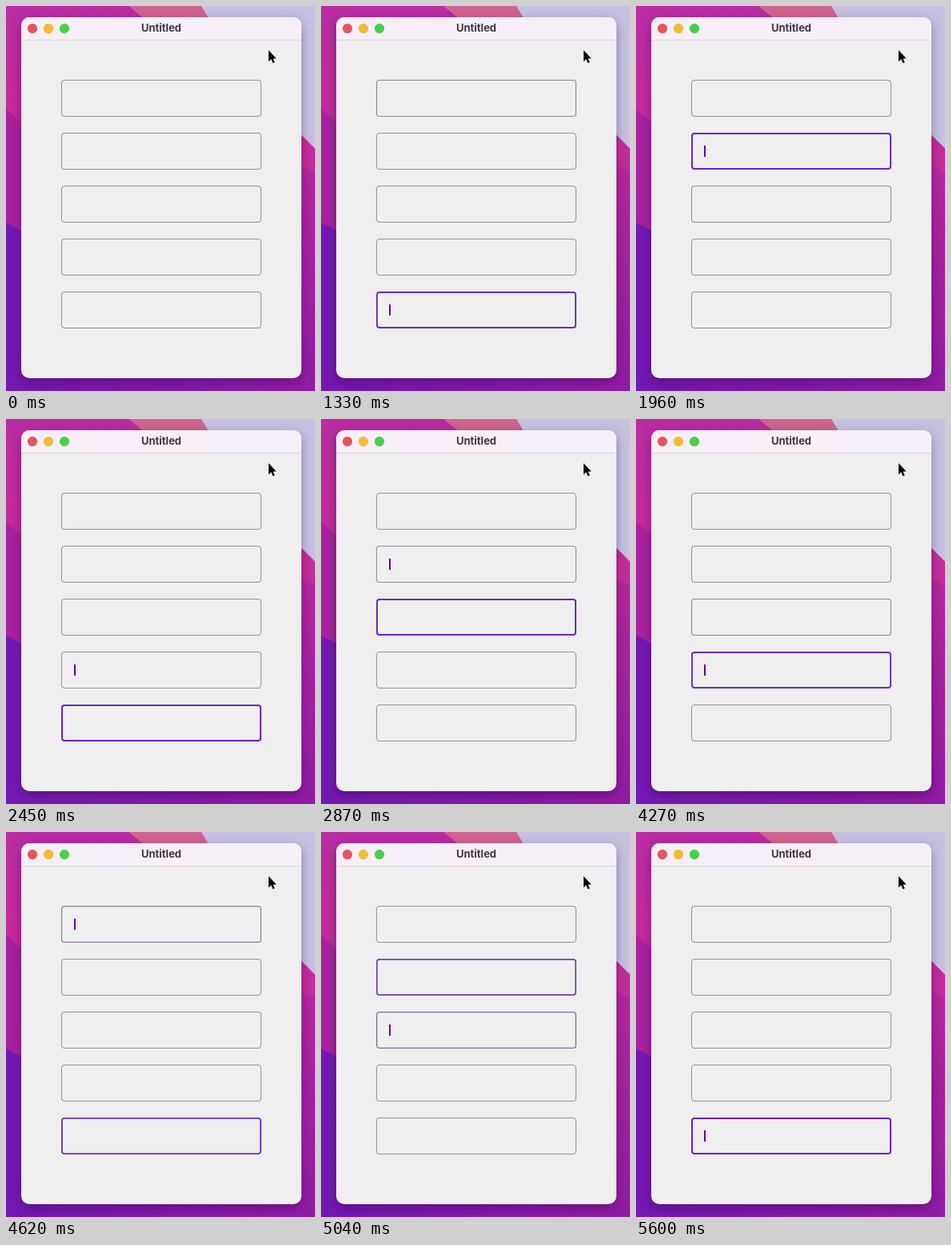
An HTML page that plays this animation: 386x480 px, repeating every 5.81 s.

```html
<!DOCTYPE html>
<html lang="en">
<head>
<meta charset="utf-8">
<title>Focus traversal</title>
<style>
  html, body { margin: 0; width: 100%; height: 100%; overflow: hidden; }
  svg { display: block; }
  .window { filter: drop-shadow(0 5px 7px rgba(30, 0, 50, .36)); }
  .title { font: 700 13px Inter, "Liberation Sans", sans-serif; fill: #40363f; text-anchor: middle; }
</style>
</head>
<body>
<svg width="386" height="480" viewBox="0 0 386 480">
  <defs>
    <linearGradient id="left" x2="0" y2="1">
      <stop offset="0" stop-color="#b92ca2"/>
      <stop offset=".27" stop-color="#c52a9c"/>
      <stop offset=".55" stop-color="#a020a6"/>
      <stop offset="1" stop-color="#8a1cae"/>
    </linearGradient>
    <linearGradient id="right" x2="0" y2="1">
      <stop offset="0" stop-color="#b9279f"/>
      <stop offset="1" stop-color="#911ba6"/>
    </linearGradient>
    <linearGradient id="floor">
      <stop offset="0" stop-color="#7419b4"/>
      <stop offset="1" stop-color="#931ca6"/>
    </linearGradient>
  </defs>

  <rect width="386" height="480" fill="url(#left)"/>
  <path d="M0 128L40 165V300H0z" fill="#aa229f"/>
  <path d="M0 270L60 300L386 440V480H0z" fill="url(#floor)"/>
  <path d="M153 0H250L270 30H190z" fill="#cf6490"/>
  <path d="M244 0H386V178L340 132L262 30z" fill="#c6c1e1"/>
  <path d="M340 132L386 178V220H340z" fill="#c52c9b"/>
  <path d="M340 187L386 207V480H340z" fill="url(#right)"/>

  <g class="window">
    <rect x="19" y="14" width="350" height="450" rx="10" fill="#efefef"/>
    <path d="M19 42V24a10 10 0 0 1 10-10H359a10 10 0 0 1 10 10V42z" fill="#f7eff8"/>
    <path d="M19 42.5H369" stroke="#dcd3dc"/>
  </g>
  <g stroke-opacity=".12" stroke="#000" stroke-width=".5">
    <circle cx="33" cy="28" r="6" fill="#ed5158"/>
    <circle cx="53" cy="28" r="6" fill="#f5bc30"/>
    <circle cx="73" cy="28" r="6" fill="#46d147"/>
  </g>
  <text class="title" x="194" y="32">Untitled</text>

  <g id="fields" fill="none"></g>
  <rect id="caret" x="85" width="2" height="14" fill="#5b06ad"/>
  <path d="M328 55V69.2L331.2 66.3L333.4 71.3L335.8 70.2L333.6 65.4H337.8z"
        fill="#000" stroke="#fff" stroke-width="1" stroke-linejoin="round" paint-order="stroke"/>
</svg>
<script>
  const LOOP = 5810, STEP = 70, FADE = 150, BLINK = 500;
  const COUNT = 5, TOP = 92, PITCH = 66;

  // Shift+Tab held for nine moves back, then Tab held for eight moves forward.
  const moves = [{ time: 680, field: 0 }];
  const hold = (start, interval, count, direction) => {
    for (let i = 0; i < count; i++) {
      const field = (moves[moves.length - 1].field + direction + COUNT) % COUNT;
      moves.push({ time: start + i * interval, field });
    }
  };
  hold(1235, 202.5, 9, -1);
  hold(3969, 206, 8, 1);

  const fields = Array.from({ length: COUNT }, () => {
    const rect = document.createElementNS("http://www.w3.org/2000/svg", "rect");
    return document.getElementById("fields").appendChild(rect);
  });
  const caret = document.getElementById("caret");

  const mix = (a, b, p) => a + (b - a) * p;

  // cubic-bezier(.4, 0, .2, 1)
  function ease(x) {
    if (x >= 1) return 1;
    let lo = 0, hi = 1;
    for (let i = 0; i < 20; i++) {
      const s = (lo + hi) / 2, r = 1 - s;
      if (1.2 * r * r * s + .6 * r * s * s + s ** 3 < x) lo = s; else hi = s;
    }
    return 3 * (1 - lo) * lo * lo + lo ** 3;
  }

  function drawField(rect, index, focus) {
    const width = mix(1, 2, focus);
    const set = (name, value) => rect.setAttribute(name, value);
    set("x", 69 + width / 2);
    set("y", TOP + index * PITCH + width / 2);
    set("width", 250 - width);
    set("height", 46 - width);
    set("rx", 4 - width / 2);
    set("stroke-width", width);
    set("stroke", `rgba(${88 * focus}, 0, ${212 * focus}, ${mix(.39, .87, focus)})`);
  }

  function draw(now) {
    const time = Math.floor(now % LOOP / STEP) * STEP;
    const last = moves.filter(m => m.time <= time).length - 1;
    const current = moves[last], previous = moves[last - 1];
    const age = current ? time - current.time : 0;
    const shift = ease(age / FADE);

    fields.forEach((rect, i) => {
      const focus = current && current.field === i ? shift
        : previous && previous.field === i ? 1 - shift : 0;
      drawField(rect, i, focus);
    });

    const visible = current && age % (2 * BLINK) < BLINK;
    caret.setAttribute("visibility", visible ? "visible" : "hidden");
    if (current) caret.setAttribute("y", TOP + current.field * PITCH + 16);
  }

  const start = performance.now();
  function frame() {
    draw(performance.now() - start);
    requestAnimationFrame(frame);
  }
  frame();
</script>
</body>
</html>
```
